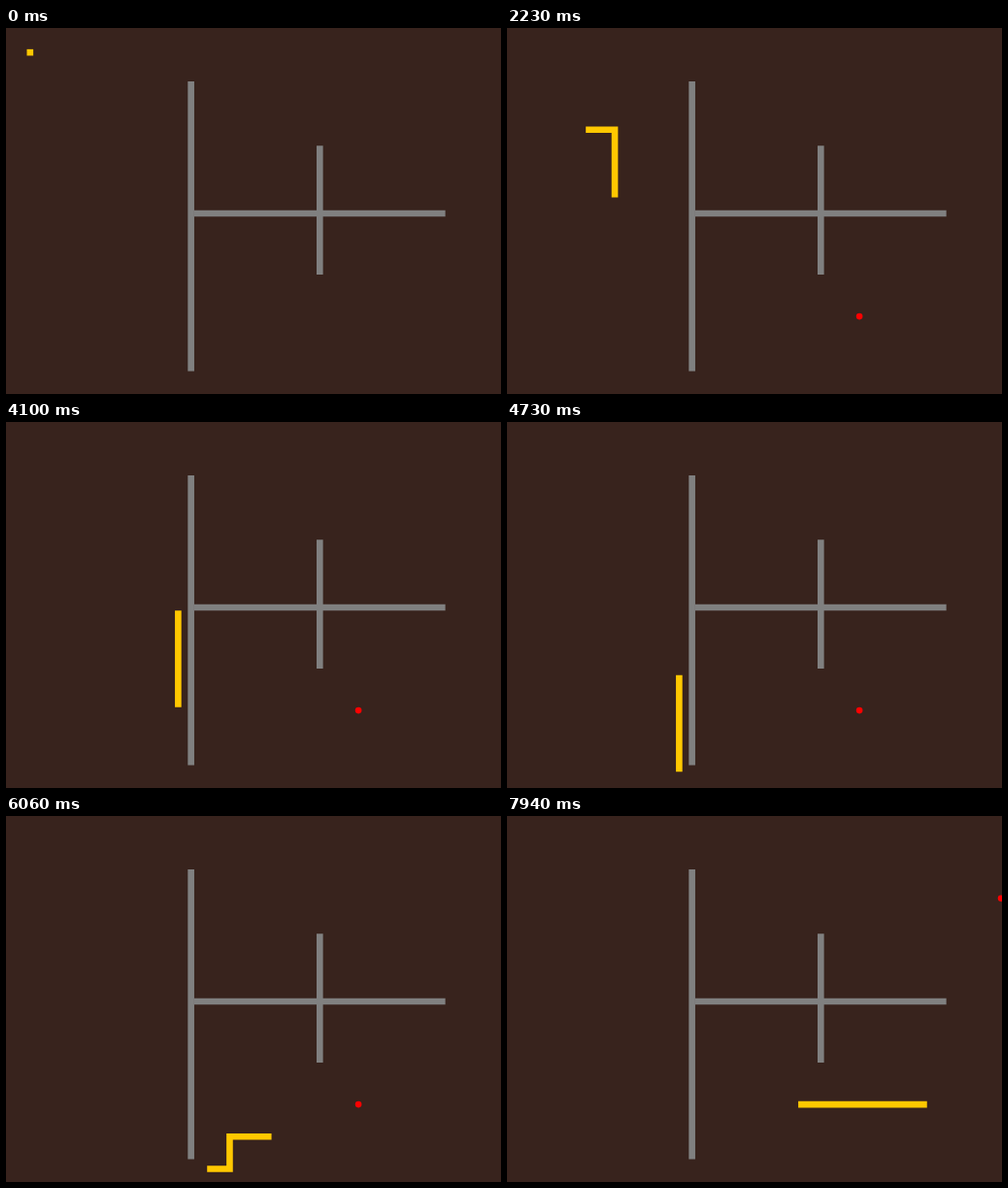
An HTML page with a canvas for the animation above (8 s loop, 510 by 377 pixels).

```html
<!DOCTYPE html>
<html lang="en">
<head>
<meta charset="utf-8">
<title>Snake</title>
<style>
  html, body { margin: 0; width: 100%; height: 100%; overflow: hidden; background: #38231d; }
  canvas { display: block; }
</style>
</head>
<body>
<canvas id="stage" width="510" height="377"></canvas>
<script>
const ctx = document.getElementById('stage').getContext('2d');

const LOOP = 8000;
const CELL = 6.633, LEFT = 1.6, TOP = 1.95;
const REFRESH_MS = 69.65, LEAD_MS = 9;
const MOVE_MS = 65.2, PHASE = 0.87;
const LENGTH = 15, GROWTH = 5, EAT_MOVE = 112;

// The snake starts here, then runs down, right, down, right...; negative is up or left
const START = 3;
const RUNS = [12, 13, 14, 10, 25, 8, -5, 8, -5, 24];

const px = col => LEFT + (col + 0.5) * CELL;
const py = row => TOP + (row + 0.5) * CELL;

// Grid cell reached after n moves
function cellAt(n) {
  const pos = [START, START];
  RUNS.forEach((run, i) => {
    const steps = Math.min(n, Math.abs(run));
    pos[(i + 1) % 2] += Math.sign(run) * steps;
    n -= steps;
  });
  return pos;
}

function strip(cells, color) {
  ctx.strokeStyle = color;
  ctx.lineWidth = CELL;
  ctx.lineCap = 'square';
  ctx.lineJoin = 'miter';
  ctx.beginPath();
  // The tiny lead-in keeps a single cell visible
  ctx.moveTo(px(cells[0][0]) - 0.01, py(cells[0][1]));
  for (const [col, row] of cells) ctx.lineTo(px(col), py(row));
  ctx.stroke();
}

function food(col, row) {
  ctx.fillStyle = '#ff0000';
  ctx.beginPath();
  ctx.arc(px(col), py(row), CELL / 2, 0, Math.PI * 2);
  ctx.fill();
}

function draw(t) {
  const shown = Math.floor((t + LEAD_MS) / REFRESH_MS) * REFRESH_MS;
  const head = Math.floor(shown / MOVE_MS + PHASE);
  const grown = Math.min(GROWTH, Math.max(0, head - EAT_MOVE));
  const tail = Math.max(0, head - LENGTH + 1 - grown);

  ctx.fillStyle = '#38231d';
  ctx.fillRect(0, 0, 510, 377);

  strip([[28, 8], [28, 52]], '#808080');
  strip([[29, 28], [67, 28]], '#808080');
  strip([[48, 18], [48, 37]], '#808080');

  if (head >= EAT_MOVE) food(76, 12);
  else if (head > 0) food(54, 44);

  const body = [];
  for (let n = tail; n <= head; n++) body.push(cellAt(n));
  strip(body, '#ffc800');
}

const start = performance.now();
function tick() {
  draw((performance.now() - start) % LOOP);
  requestAnimationFrame(tick);
}
tick();
</script>
</body>
</html>
```
